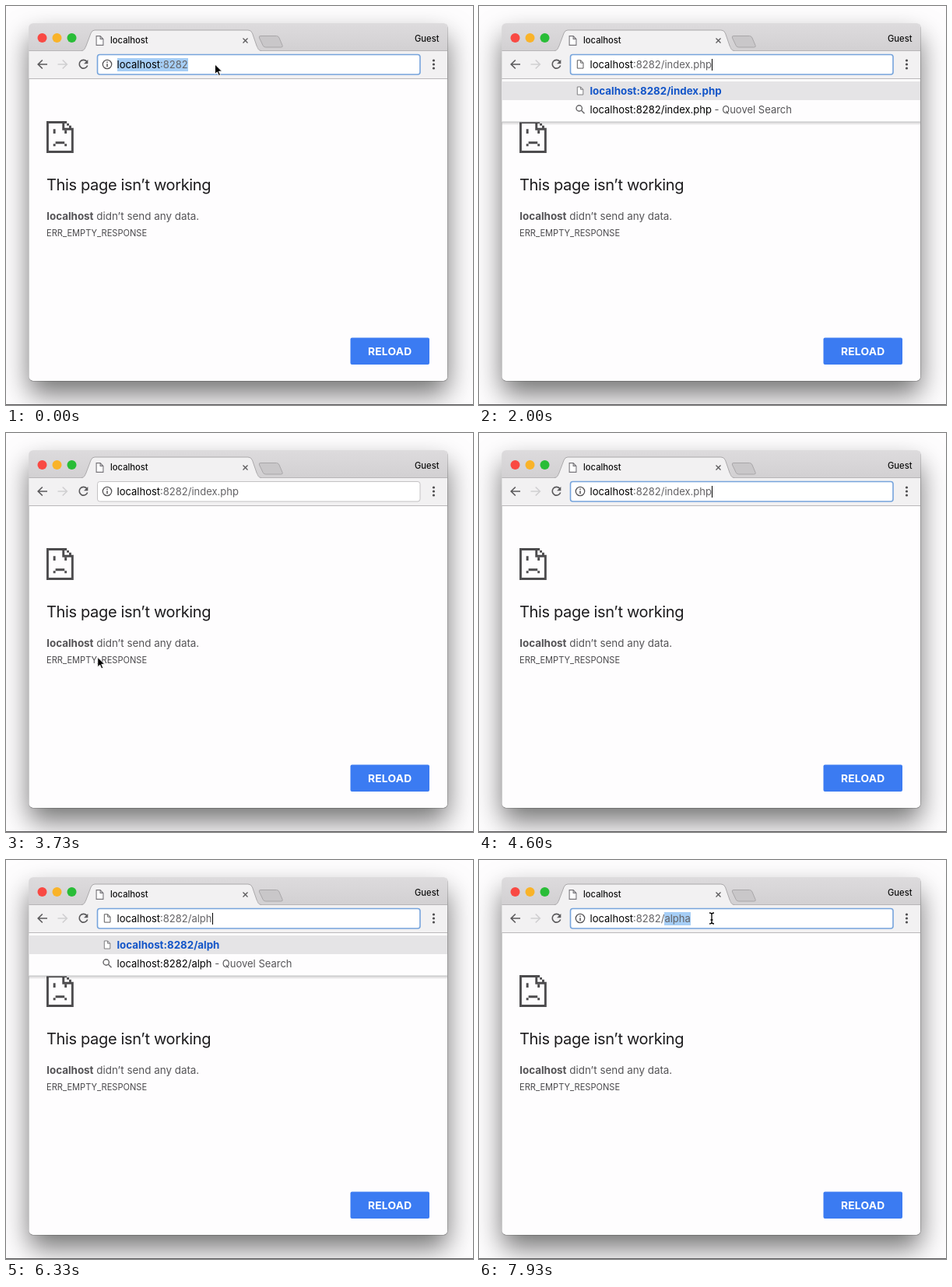
An HTML page for the animation above (8000 ms loop, 600 by 513 pixels).

```html
<!DOCTYPE html>
<html lang="en">
<head>
<meta charset="utf-8">
<title>Address bar</title>
<style>
  html, body { margin: 0; width: 100%; height: 100%; overflow: hidden; background: #fefdfe; }
  body { position: relative; font-family: Inter, "Open Sans", sans-serif; }
  svg { position: absolute; left: 0; top: 0; }
  text { white-space: pre; }
  #window {
    position: absolute; left: 29.5px; top: 22.5px; width: 537.5px; height: 459px; border-radius: 5px;
    box-shadow: 0 0 0 .5px rgba(0,0,0,.25), 0 0 1px rgba(0,0,0,.5), 0 17px 35px rgba(0,0,0,.55);
  }
  #url {
    position: absolute; left: 142.5px; top: 67px; height: 17px;
    font-size: 13px; line-height: 17px; white-space: pre; color: #636265;
  }
  #url span { display: inline-block; height: 17px; vertical-align: top; }
  #url .host { color: #000; }
  #caret { position: absolute; right: -1px; top: 1px; width: 1px; height: 15px; background: #000; }
  .selected { background: #a6cef6; }
</style>
</head>
<body>
<div id="window"></div>

<svg width="600" height="513">
  <defs>
    <linearGradient id="titlebar" x2="0" y2="1">
      <stop stop-color="#dddbdd"/><stop offset="1" stop-color="#d2d0d2"/>
    </linearGradient>
    <linearGradient id="fade" x2="0" y2="1">
      <stop stop-opacity=".16"/><stop offset="1" stop-opacity="0"/>
    </linearGradient>
    <clipPath id="frame"><rect x="29.500" y="22.500" width="537.500" height="459" rx="5"/></clipPath>
    <path id="doc" d="M.6.6H5.6L9.4 4.4V12.4H.6ZM5.6.6V4.4H9.4" fill="#fff" stroke-width="1.1"/>
  </defs>

  <g clip-path="url(#frame)">
    <rect x="29" y="22" width="538" height="460" fill="#fefdfe"/>
    <rect x="29" y="22" width="538" height="36" fill="url(#titlebar)"/>
    <rect x="29" y="57" width="538" height="1" fill="#b7b5b7"/>
    <rect x="29" y="58" width="538" height="35" fill="#f2f1f2"/>
    <rect x="29" y="93" width="538" height="1" fill="#bab8ba"/>
    <path d="M97 58C101 57 101 55 103 51L109 35Q110.500 31 114 31H311Q315 31 316.500 35L322 51C324 55 324 57 328 58Z" fill="#f2f1f2"/>
    <path d="M97 57.500C101 57 101 55 103 51L109 35Q110.500 31 114 31H311Q315 31 316.500 35L322 51C324 55 324 57 328 57.500" fill="none" stroke="#aaa8aa"/>
    <path d="M327 38.500H347.500Q350 38.500 351 41L355 50.500Q356 53 353.500 53H333.500Q331 53 330 50.500L325.500 41Q324.500 38.500 327 38.500Z" fill="#c9c7c9" stroke="#a9a7a9"/>
  </g>

  <circle cx="46.500" cy="41" r="6" fill="#f94943"/>
  <circle cx="65.500" cy="41" r="6" fill="#f9b329"/>
  <circle cx="84.500" cy="41" r="6" fill="#29bd37"/>
  <use href="#doc" x="115.500" y="38" stroke="#77757a"/>
  <g font-size="11.200" font-weight="500" fill="#111">
    <text x="134" y="48.300">localhost</text>
    <text x="525" y="45.600">Guest</text>
  </g>

  <g fill="none" stroke="#5b5a5c" stroke-width="1.600">
    <path d="M304.500 41.500l6 6M310.500 41.500l-6 6" stroke-width="1.300"/>
    <path d="M53 75H41.500M46.800 69.500L41.200 75L46.800 80.500"/>
    <path d="M66.500 75H78M72.700 69.500L78.300 75L72.700 80.500" stroke="#d0cfd1"/>
    <path d="M103.700 71.200A5.400 5.400 0 1 0 104.700 76.600"/>
    <path d="M105.300 69V74.300H100Z" fill="#5b5a5c" stroke="none"/>
  </g>
  <g fill="#4e4d4f">
    <circle cx="549.500" cy="70" r="1.600"/><circle cx="549.500" cy="75" r="1.600"/><circle cx="549.500" cy="80" r="1.600"/>
  </g>

  <rect id="omnibox" x="117.500" y="62.500" width="414.500" height="25.500" rx="3" fill="#fff"/>
  <g id="info" fill="none" stroke="#555456" stroke-width="1.300">
    <circle cx="130" cy="75" r="5.700"/>
    <path d="M130 74.200V78.300M130 71.500V72.900" stroke-width="1.500"/>
  </g>
  <use id="editIcon" href="#doc" transform="translate(125.800 69.300) scale(.87)" stroke="#555456"/>

  <g transform="translate(52 148) scale(2.900 2.930)" fill="#4d4c4e">
    <path fill-rule="evenodd" d="M0 0H9V1H10V2H11V3H12V14H0ZM1 1V13H11V4H7V1ZM8 1V3H10V2H9V1Z"/>
    <path d="M3 3.500H4V5.500H3ZM8 4H9V5.500H8ZM4 9H8V10H4ZM3 10H4V11H3ZM8 10H9V11H8Z"/>
  </g>
  <text x="52" y="237.300" font-size="20" letter-spacing="-.35" fill="#1c1b1d">This page isn’t working</text>
  <text x="52.300" y="274.500" font-size="13.400" fill="#555457"><tspan font-weight="700">localhost</tspan> didn’t send any data.</text>
  <text x="52" y="295.700" font-size="11.100" fill="#4a494c">ERR_EMPTY_RESPONSE</text>
  <rect x="442.500" y="426.500" width="101.500" height="34.500" rx="2" fill="#3b7bf2"/>
  <text x="493.200" y="448.600" font-size="13.800" font-weight="700" letter-spacing=".2" text-anchor="middle" fill="#fff">RELOAD</text>

  <g id="dropdown" font-size="13">
    <rect x="29.500" y="94" width="537.500" height="55" fill="#fefdfe"/>
    <rect x="29.500" y="97" width="537.500" height="24" fill="#e5e4e6"/>
    <rect x="29.500" y="148.500" width="537.500" height="1" fill="#c6c5c7"/>
    <rect x="29.500" y="149.500" width="537.500" height="4" fill="url(#fade)"/>
    <use href="#doc" transform="translate(125.800 103.500) scale(.85)" stroke="#77767a"/>
    <g fill="none" stroke="#666568" stroke-width="1.400">
      <circle cx="128.700" cy="131.500" r="3.700"/><path d="M131.500 134.300L135.500 138.300"/>
    </g>
    <text id="match" x="142.500" y="113.700" font-size="13.350" font-weight="700" fill="#1355c8"></text>
    <text x="142.500" y="137.700" fill="#555457"><tspan id="query" fill="#000"></tspan> - Quovel Search</text>
  </g>

  <rect y="512" width="600" height="1" fill="#5c5b5d"/>
</svg>

<div id="url"><span class="host">localhost</span><span id="port"></span><span id="tail"></span><i id="caret"></i></div>

<svg width="600" height="513">
  <path id="arrow" d="M0 0V12.500L2.900 9.800L4.900 14.500L7 13.600L5 9H9Z" fill="#000" stroke="#fff" stroke-width=".9"/>
  <g id="beam" fill="none">
    <path d="M-3-7Q0-7 0-5Q0-7 3-7M0-5V5M-3 7Q0 7 0 5Q0 7 3 7M-1.500 2H1.500" stroke="#fff" stroke-width="3"/>
    <path d="M-3-7Q0-7 0-5Q0-7 3-7M0-5V5M-3 7Q0 7 0 5Q0 7 3 7M-1.500 2H1.500" stroke="#000" stroke-width="1.300"/>
  </g>
</svg>

<script>
const LOOP = 8000;
const FILE = 'index.php', WORD = 'alpha';
const fileKeys = [480, 680, 850, 1000, 1150, 1330, 1480, 1590, 1700, 1830];
const wordKeys = [5800, 5950, 6100, 6230, 6420];
const DELETE_START = 4750, DELETE_STEP = 85;

// Pointer journeys: start, end, hide time, from, to.
const moves = [
  [0, 1, 250, [268.5, 75], [268.5, 75]],
  [2450, 2850, 3600, [268.5, 75], [87.5, 324]],
  [3600, 4150, 4480, [87.5, 324], [299, 75]],
  [7100, 7400, LOOP, [318, 98], [299, 75]],
];

const $ = id => document.getElementById(id);
const show = (id, on) => { $(id).style.display = on ? '' : 'none'; };
const within = (t, ...spans) => spans.some(([a, b]) => t >= a && t < b);
const pressed = (keys, t) => keys.filter(k => k <= t).length;
const ease = p => p * p * (3 - 2 * p);

function pathAt(t) {
  if (t < DELETE_START) return ('/' + FILE).slice(0, pressed(fileKeys, t));
  if (t >= wordKeys[0]) return '/' + WORD.slice(0, pressed(wordKeys, t));
  const left = FILE.length - 1 - Math.floor((t - DELETE_START) / DELETE_STEP);
  return '/' + FILE.slice(0, Math.max(0, left));
}

function drawPointer(t) {
  const move = moves.find(([start, , hide]) => t >= start && t < hide);
  let isBeam = false;
  if (move) {
    const [start, end, , from, to] = move;
    const p = ease(Math.min(1, (t - start) / (end - start)));
    const [x, y] = from.map((v, i) => v + (to[i] - v) * p);
    isBeam = t > 3000 && x > 118 && y > 62 && y < 88;
    $(isBeam ? 'beam' : 'arrow').setAttribute('transform', `translate(${x} ${y})`);
  }
  show('arrow', move && !isBeam);
  show('beam', move && isBeam);
}

function draw(t) {
  const path = pathAt(t);
  const address = 'localhost:8282' + path;
  const editing = within(t, [fileKeys[0], 2250], [DELETE_START, 6650]);
  const focused = within(t, [0, 2250], [4200, 6650], [7450, LOOP]);
  const allSelected = within(t, [0, 250], [4200, 4480], [7450, 7720]);
  const wordSelected = t >= 7720;

  $('port').textContent = ':8282' + path.slice(0, 1);
  $('tail').textContent = path.slice(1);
  $('url').classList.toggle('selected', allSelected);
  $('tail').classList.toggle('selected', wordSelected);
  show('caret', focused && !allSelected && !wordSelected);

  $('omnibox').setAttribute('stroke', focused ? '#76a4dc' : '#c4c2c4');
  $('omnibox').setAttribute('stroke-width', focused ? 1.6 : 1);
  show('info', !editing);
  show('editIcon', editing);
  show('dropdown', editing);
  $('match').textContent = address.replace(/\/$/, '');
  $('query').textContent = address;
  drawPointer(t);
}

function tick() {
  draw(performance.now() % LOOP);
  requestAnimationFrame(tick);
}
tick();
</script>
</body>
</html>
```
